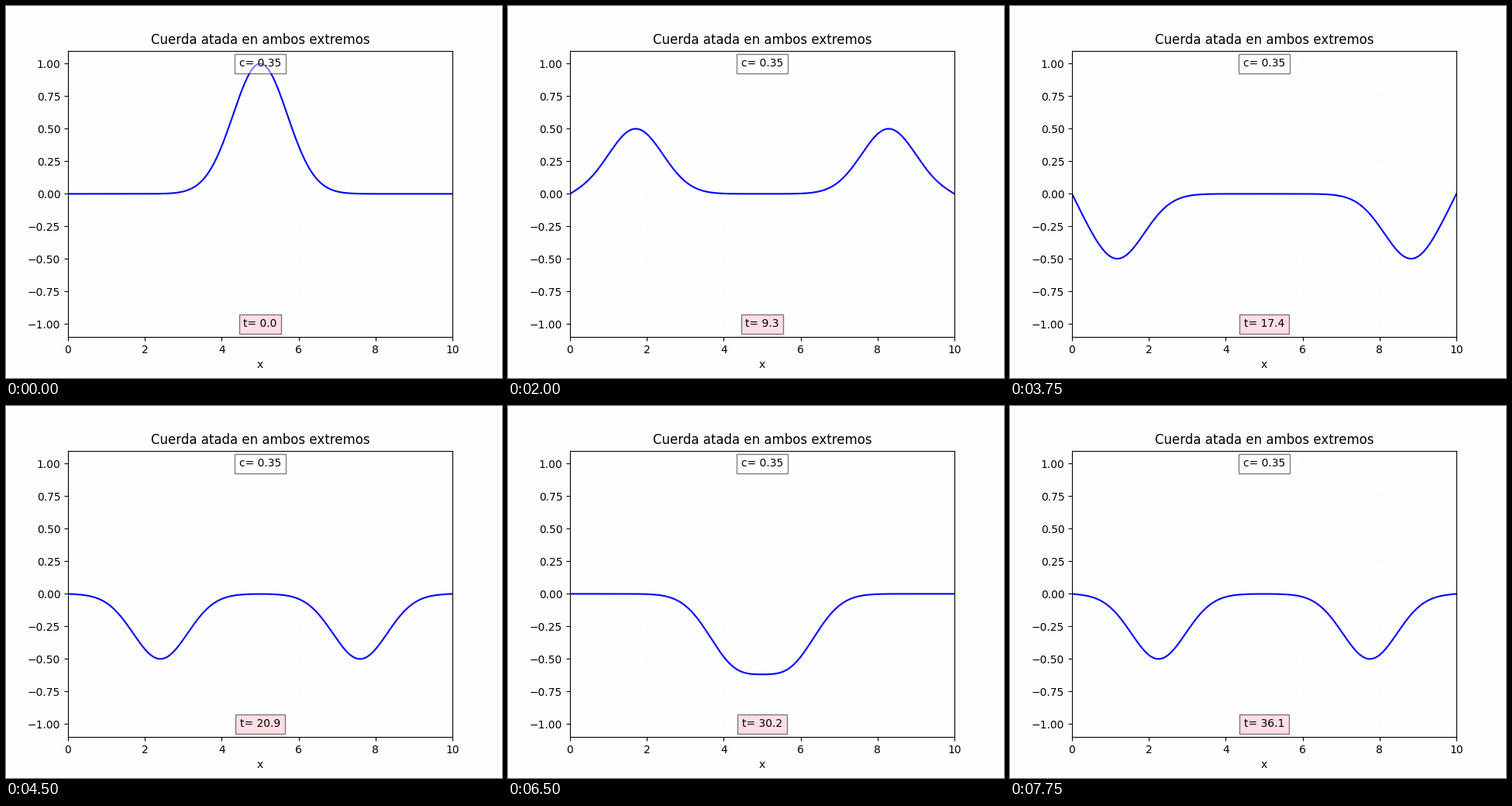
Write a matplotlib script that moves like this. It is 640x480 px and loops after 8000 ms.

```python
import numpy as np
import matplotlib.pyplot as plt
from matplotlib.animation import FuncAnimation

LENGTH = 10
SPEED = np.sqrt(1 / 8)
FRAMES, INTERVAL = 32, 250
TIME_STEP = 57 / 49
BACKGROUND = "#fefefe"


def pulse(x):
    """Gaussian bump, extended as an odd function of period 2 * LENGTH."""
    s = np.mod(x, 2 * LENGTH)
    mirrored = s > LENGTH
    s = np.where(mirrored, 2 * LENGTH - s, s)
    bump = np.exp(-(s - 5) ** 2) - np.exp(-(s + 5) ** 2) - np.exp(-(s - 15) ** 2)
    return np.where(mirrored, -bump, bump)


def string_shape(x, t):
    """Two half-height waves travelling apart, inverted at the fixed ends."""
    shift = SPEED * t
    return (pulse(x - shift) + pulse(x + shift)) / 2


def label(y, text, color):
    return ax.text(5, y, text, ha="center", va="center",
                   bbox=dict(facecolor=color, alpha=0.5))


plt.rcParams["font.family"] = "DejaVu Sans"
fig, ax = plt.subplots(figsize=(6.4, 4.8), dpi=100, facecolor=BACKGROUND)
ax.set_facecolor(BACKGROUND)
ax.set(xlim=(0, LENGTH), ylim=(-1.1, 1.1), xlabel="x",
       title="Cuerda atada en ambos extremos")
ax.set_yticks(np.linspace(-1, 1, 9))

# Faint dots where the grid lines would cross
gx, gy = np.meshgrid(np.arange(2, LENGTH, 2), np.linspace(-1, 1, 9))
ax.plot(gx.ravel(), gy.ravel(), ",", color="#e4e4e4", zorder=1)

x = np.linspace(0, LENGTH, 401)
line, = ax.plot(x, string_shape(x, 0), color="b", lw=1.5)
label(1, f"c= {SPEED:.2f}", "white")
clock = label(-1, "t= 0.0", "pink")


def update(frame):
    t = frame * TIME_STEP
    line.set_ydata(string_shape(x, t))
    clock.set_text(f"t= {t:.1f}")
    return line, clock


anim = FuncAnimation(fig, update, frames=FRAMES, interval=INTERVAL,
                     repeat=True, repeat_delay=0)
plt.show()
```
